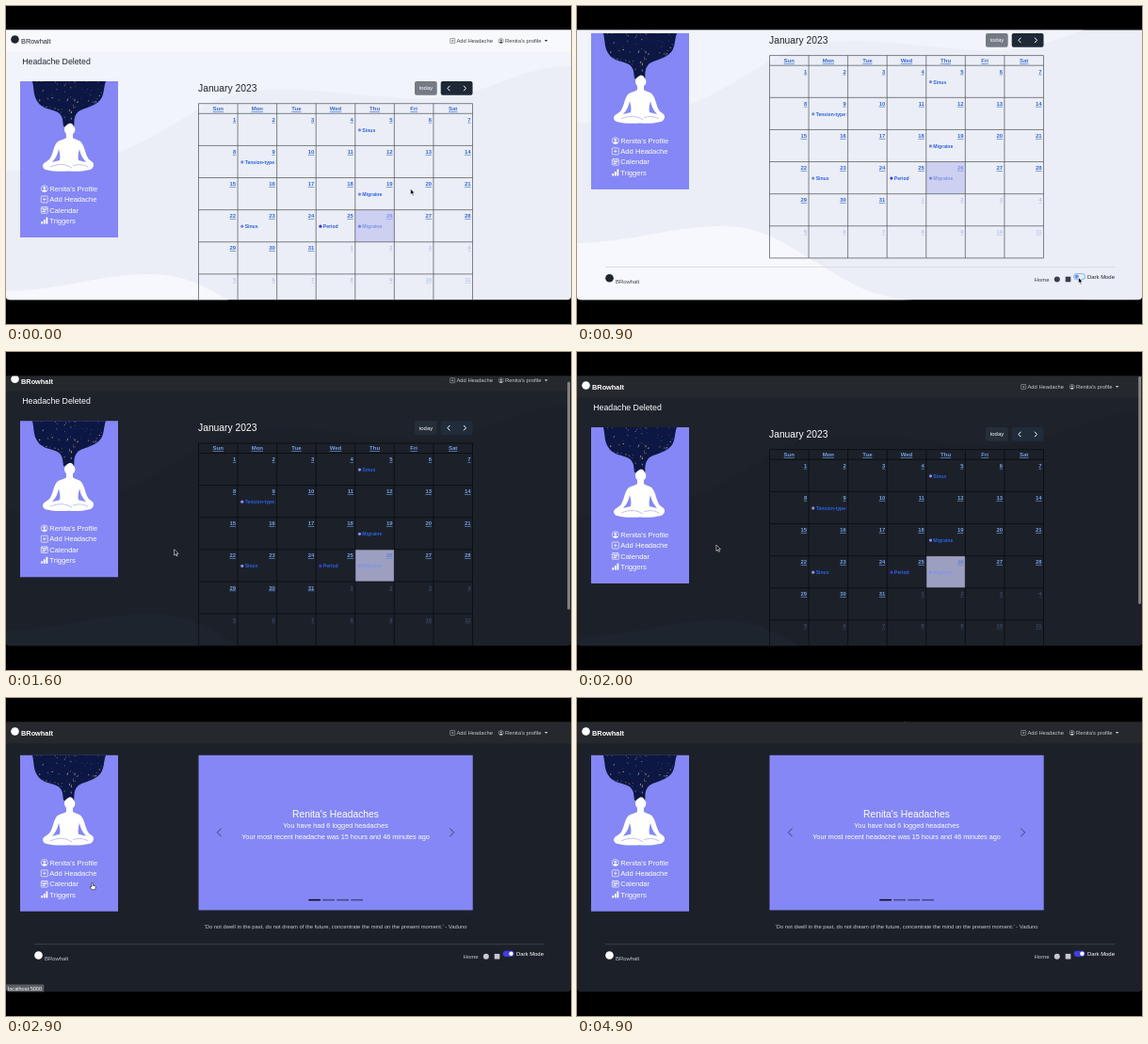
Recreate the animation shown at these times as an HTML page. Size 600x338 px, loop 5000 ms.

```html
<!DOCTYPE html>
<html lang="en">
<head>
<meta charset="utf-8">
<title>Headache calendar</title>
<style>
html, body { margin: 0; width: 100%; height: 100%; overflow: hidden; background: #000; }
svg {
  display: block; width: 100vw; height: 100vh;
  font-family: "Liberation Sans", Arial, sans-serif;
  --bg: #ebeef6; --bar: #f8f9fc; --wave: #f6f8fd; --ink: #1f2530; --soft: #3a404a;
  --link: #3468dc; --event: #2b62e6; --grid: #4b4f58; --rule: #d6d9e2;
  --today: #cdd0f1; --todayLink: #7f95e6; --btn: #757b85; --nav: #1e2837; --dot: #7187e0;
}
svg.dark {
  --bg: #1c2129; --bar: #25292d; --wave: #1e242d; --ink: #fff; --soft: #c6c9ce;
  --link: #75a0ea; --event: #588bee; --grid: #07090c; --rule: #454a51;
  --today: #9c9fc0; --todayLink: #667fd2; --btn: #262e38; --nav: #212c3a; --dot: #8b8df0;
}
text { fill: var(--ink); white-space: pre; }
.soft { fill: var(--soft); }
.white { fill: #fff; }
.link { fill: var(--link); font-weight: bold; text-decoration: underline; }
.event { fill: var(--event); font-weight: bold; }
.faded { fill: var(--todayLink); }
.other { opacity: .3; }
.icon { fill: none; stroke-width: 1; }
.dark .brand { font-weight: bold; }
</style>
</head>
<body>
<svg id="stage" viewBox="0 0 600 338" preserveAspectRatio="none"></svg>
<script>
const stage = document.getElementById("stage");
const BRAND = "BRowhalt", USER = "Renita", LOOP = 5000;

// y is the middle of the capitals
const text = (x, y, s, size, cls = "", anchor = "start") =>
  `<text x="${x}" y="${y + size * .36}" font-size="${size}" class="${cls}" text-anchor="${anchor}">${s}</text>`;
const rect = (x, y, w, h, fill, extra = "") =>
  `<rect x="${x}" y="${y}" width="${w}" height="${h}" fill="${fill}" ${extra}/>`;
const circle = (x, y, r, fill, extra = "") =>
  `<circle cx="${x}" cy="${y}" r="${r}" fill="${fill}" ${extra}/>`;
const path = (d, fill, extra = "") => `<path d="${d}" fill="${fill}" ${extra}/>`;
const line = (d, color, w = .7) => path(d, "none", `stroke="${color}" stroke-width="${w}"`);

// icons are drawn in an 8 by 8 box
const shapes = {
  person: c => circle(4, 4, 3.5, "none", `stroke="${c}" stroke-width=".65"`) + circle(4, 3.2, 1.3, c) +
    path("M1.5 6.4Q4 3.6 6.5 6.4Q4 8.2 1.5 6.4Z", c),
  plus: c => rect(.5, .5, 7, 7, "none", `rx=".8" stroke="${c}" stroke-width=".65"`) + line("M4 2.2V5.8M2.2 4H5.8", c),
  calendar: c => rect(.5, .9, 7, 6.6, "none", `rx=".8" stroke="${c}" stroke-width=".65"`) +
    line("M.5 2.5H7.5M2 .1V1.4M6 .1V1.4", c) + line("M2 4H6.4M1.6 5.7H5", c, 1),
  bars: c => rect(.5, 5, 1.8, 2.5, c) + rect(3.1, 3, 1.8, 4.5, c) + rect(5.7, .5, 1.8, 7, c)
};
const icon = (name, x, y, size, color) =>
  `<g transform="translate(${x - size / 2} ${y - size / 2}) scale(${size / 8})">${shapes[name](color)}</g>`;

function random(seed) {
  return () => (seed = seed * 16807 % 2147483647) / 2147483647;
}

function sparkles() {
  const rnd = random(77), colors = ["#b98a5e", "#d9b27c", "#7d6b78", "#e9e0d4", "#47649a"];
  let out = "";
  for (let i = 0; i < 120; i++) {
    const x = 12 + rnd() * 80, y = rnd() * 46, a = rnd() * 6.3, c = colors[i % 5];
    out += i % 3 ? circle(x, y, .2 + rnd() * .45, c)
      : line(`M${x} ${y}l${2 * Math.cos(a)} ${2 * Math.sin(a)}`, c, .55);
  }
  return out;
}

const hair = "M13 0C15 9 14 15 18 21C23 30 33 29 40 33C46 37 45 42 46 48L57 50C58 44 56 39 61 33C67 28 76 28 83 22C90 16 88 8 91 0Z";
const body = "M52 45C55 44 56 46 57 48C59 50 59 54 56 56L56 60C58 62 63 62 65 65C69 70 69 78 73 83" +
  "L77 86C79 88 78 93 74 94C66 96 58 96 52 95.5C44 96 34 96 27 94C23 92 23 88 27 86L31 83" +
  "C35 78 35 70 39 65C42 62 47 62 49 60L49 56C46 53 46 47 52 45Z";
const sidebar = `<g id="side">
  ${rect(15, 0, 104, 166, "#8487f5")}
  <g transform="translate(15 0)">
    ${path(hair, "#0c1743")}<g clip-path="url(#hair)">${sparkles()}</g>
    ${path(body, "#fff")}
    ${path("M41 72C40 77 38 82 34 86L42 84C43 80 42 76 41 72ZM63 72C64 77 66 82 70 86L62 84C61 80 62 76 63 72Z", "#8487f5")}
    ${line("M32 91C42 87 48 88 55 92M72 91C66 88 61 88 56 90", "#8487f5", .5)}
  </g>
  ${[["person", USER + "'s Profile"], ["plus", "Add Headache"], ["calendar", "Calendar"], ["bars", "Triggers"]]
    .map(([name, label], i) => icon(name, 40.8, 114.2 + i * 11.3, 8, "#fff") +
      text(46.3, 114.2 + i * 11.3, label, 7.6, "white")).join("")}
</g>`;

const header = rect(0, 25, 600, 23.3, "var(--bar)") +
  circle(9.5, 35.5, 4.3, "var(--ink)") + text(16, 37.8, BRAND, 7.36, "brand") +
  icon("plus", 474.2, 37, 5.8, "var(--soft)") + text(478.5, 37, "Add Headache", 5.8, "soft") +
  icon("person", 525.7, 37, 5.8, "var(--soft)") + text(530, 37, USER + "'s profile", 5.85, "soft") +
  path("M571.8 36h3.6l-1.8 1.9z", "var(--soft)");

const footer = y => line(`M30 ${y}H571`, "var(--rule)", .8) +
  circle(34.5, y + 11.8, 4.3, "var(--ink)") + text(41, y + 15, BRAND, 5.9, "soft") +
  text(485.5, y + 13.2, "Home", 6, "soft") +
  circle(509.8, y + 13, 3, "var(--soft)") + rect(518.7, y + 10.2, 5.6, 5.6, "var(--soft)") +
  `<g class="toggle" transform="translate(527.7 ${y + 7})"></g>` +
  text(542, y + 10.3, "Dark Mode", 5.93);

const toggle = (on, focus) => on
  ? rect(0, 0, 11.8, 6.2, "#3f3de2", 'rx="3.1"') + circle(8.7, 3.1, 2.2, "#fff")
  : (focus ? rect(-.6, -.6, 13, 7.4, "#b9cdf6", 'rx="3.7"') : "") +
    rect(0, 0, 11.8, 6.2, focus ? "#e4ecfc" : "#fff", `rx="3.1" stroke="${focus ? "#6f97e8" : "#dadde4"}" stroke-width=".6"`) +
    circle(3.1, 3.1, 2.1, focus ? "#6a93e6" : "#c3c6cc");

function calendar() {
  const left = 204.5, col = 41.57, top = 103.7, first = 114.3, row = 34.12, bottom = first + 6 * row;
  const cellX = i => left + i % 7 * col, cellY = i => first + Math.floor(i / 7) * row;
  let out = text(204, 87.3, "January 2023", 10.3) +
    rect(434, 80, 23.7, 14.8, "var(--btn)", 'rx="2"') + text(445.9, 87.2, "today", 5.9, "white", "middle") +
    rect(461.7, 80, 33.8, 14.8, "var(--nav)", 'rx="2"') +
    line("M471.4 84.8l-2.5 2.7l2.5 2.7M486 84.8l2.5 2.7l-2.5 2.7", "#fff", 1) +
    rect(cellX(25), cellY(25), col, row, "var(--today)");
  let grid = `M${left} ${top}H${left + 7 * col}`;
  for (let i = 0; i < 8; i++) grid += `M${left + i * col} ${top}V${bottom}`;
  for (let i = 0; i < 7; i++) grid += `M${left} ${first + i * row}H${left + 7 * col}`;
  out += line(grid, "var(--grid)");
  ["Sun", "Mon", "Tue", "Wed", "Thu", "Fri", "Sat"].forEach((d, i) =>
    out += text(left + (i + .5) * col, 108.9, d, 6, "link", "middle"));
  for (let i = 0; i < 42; i++)
    out += text(cellX(i) + col - 1.9, cellY(i) + 6.4, i % 31 + 1, 5.9,
      "link" + (i > 30 ? " other" : i == 25 ? " faded" : ""), "end");
  const events = { 5: "Sinus", 9: "Tension-type Headache", 19: "Migraine", 23: "Sinus", 25: "Period", 26: "Migraine" };
  for (const day in events) {
    const x = cellX(day - 1), y = cellY(day - 1) + 17.5;
    out += circle(x + 4.7, y, 1.6, day == 25 ? "#3a37dc" : "var(--dot)") +
      `<svg x="${x}" y="${y - 5}" width="${col - .8}" height="10">` +
      text(7.6, 5, events[day], 5.1, "event" + (day == 26 ? " faded" : "")) + "</svg>";
  }
  return out;
}

const waves = path("M0 175C90 178 140 150 200 112S330 92 420 98S540 62 600 64V48H0Z", "var(--wave)", 'opacity=".6"') +
  path("M0 303C60 302 95 286 150 285S230 312 290 345S420 362 600 364V400H0Z", "var(--wave)");

const profile = rect(204.5, 60.8, 291.2, 164.7, "#8487f5") +
  text(350, 122.8, USER + "'s Headaches", 10.3, "white", "middle") +
  text(350, 135.8, "You have had 6 logged headaches", 7.27, "white", "middle") +
  text(350, 147.4, "Your most recent headache was 15 hours and 46 minutes ago", 7.27, "white", "middle") +
  line("M228.6 138.6l-4.2 4.3l4.2 4.3M471.4 138.6l4.2 4.3l-4.2 4.3", "#34375f", .9) +
  [0, 1, 2, 3].map(i => rect(321.3 + i * 15, 213.9, 12.7, 1.5, i ? "#444684" : "#080812")).join("") +
  text(350, 242.4, "'Do not dwell in the past, do not dream of the future, concentrate the mind on the present moment.' - Vaduno", 5.84, "soft", "middle") +
  footer(261.7);

stage.innerHTML = `<defs>
  <clipPath id="hair"><path d="${hair}"/></clipPath>
  <clipPath id="window"><path d="M0 25.5H600V308.5Q600 312.3 596 312.3H4Q0 312.3 0 308.5Z"/></clipPath>
  ${sidebar}
</defs>
<g clip-path="url(#window)">
  ${rect(0, 25, 600, 288, "var(--bg)")}
  <g id="month">${waves}${header}${text(17.3, 59, "Headache Deleted", 8.76)}<use href="#side" y="80"/>${calendar()}${footer(328.6)}</g>
  <g id="profile">${header}<use href="#side" y="60.8"/>${profile}</g>
  ${rect(596.2, 0, 2.8, 242, "#858589", 'id="thumb" rx="1.4"')}
  <g id="status">${rect(-2, 304.5, 42.3, 9, "#5b5f64", 'rx="1"')}${text(2, 308.5, "localhost:5000", 5.6, "white")}</g>
  <g id="cursor">
    <path id="arrow" d="M0 0V6.2L1.4 4.9L2.4 7.2L3.5 6.7L2.5 4.5H4.4Z" fill="#000" stroke="#fff" stroke-width=".6"/>
    <path id="hand" d="M-.6 0Q.2 -.8 .8 0V2.6L3.3 3.2Q4 3.5 3.8 4.4L3.2 7H-.3L-2.4 4.2Q-2 3.2 -.6 4.2Z" fill="#fff" stroke="#111" stroke-width=".6"/>
  </g>
</g>`;

// keys: [time, value, value, ...], eased between neighbours
const smooth = u => u * u * (3 - 2 * u), easeOut = u => 1 - (1 - u) ** 2;
function track(keys, t, ease) {
  const i = keys.findIndex(k => k[0] > t);
  if (i < 0) return keys[keys.length - 1].slice(1);
  if (i == 0) return keys[0].slice(1);
  const a = keys[i - 1], b = keys[i], u = ease((t - a[0]) / (b[0] - a[0]));
  return a.slice(1).map((v, j) => v + (b[j + 1] - v) * u);
}
const scrollKeys = [[0, 0], [50, 0], [300, 51.5], [600, 51.1], [1250, 51.1], [1800, 0]];
const cursorKeys = [[0, 429.6, 194.3], [500, 429.6, 194.3], [850, 532.5, 288.5], [1200, 532.5, 288.5],
  [1600, 178.6, 209.8], [1800, 178.6, 209.8], [2300, 91.5, 196.7], [3000, 91.5, 196.7],
  [3700, 328, 261.7], [4300, 328, 261.7], [4700, 345, 18]];

const $ = id => document.getElementById(id);
const show = (id, on) => $(id).setAttribute("display", on ? "inline" : "none");
const toggles = [...document.querySelectorAll(".toggle")];
let shown = -1;

function draw(now) {
  requestAnimationFrame(draw);
  const t = Math.floor(now % LOOP / 100) * 100;
  if (t == shown) return;
  shown = t;
  const dark = t >= 1100, onProfile = t >= 2700;
  const [scroll] = track(scrollKeys, t, easeOut);
  const [x, y] = track(cursorKeys, t, smooth);
  const pointing = t >= 2200 && t < 3100;
  stage.classList.toggle("dark", dark);
  toggles.forEach(el => el.innerHTML = toggle(dark, t >= 800));
  show("month", !onProfile);
  show("profile", onProfile);
  show("status", t >= 2300 && t < 3200);
  show("thumb", t >= 100 && t < 700 || t >= 1300 && t < 2200);
  show("hand", pointing);
  show("arrow", !pointing);
  $("month").setAttribute("transform", `translate(0 ${-scroll})`);
  $("thumb").setAttribute("y", 26 + scroll * .86);
  $("cursor").setAttribute("transform", `translate(${x} ${y})`);
}
draw(performance.now());
</script>
</body>
</html>
```
